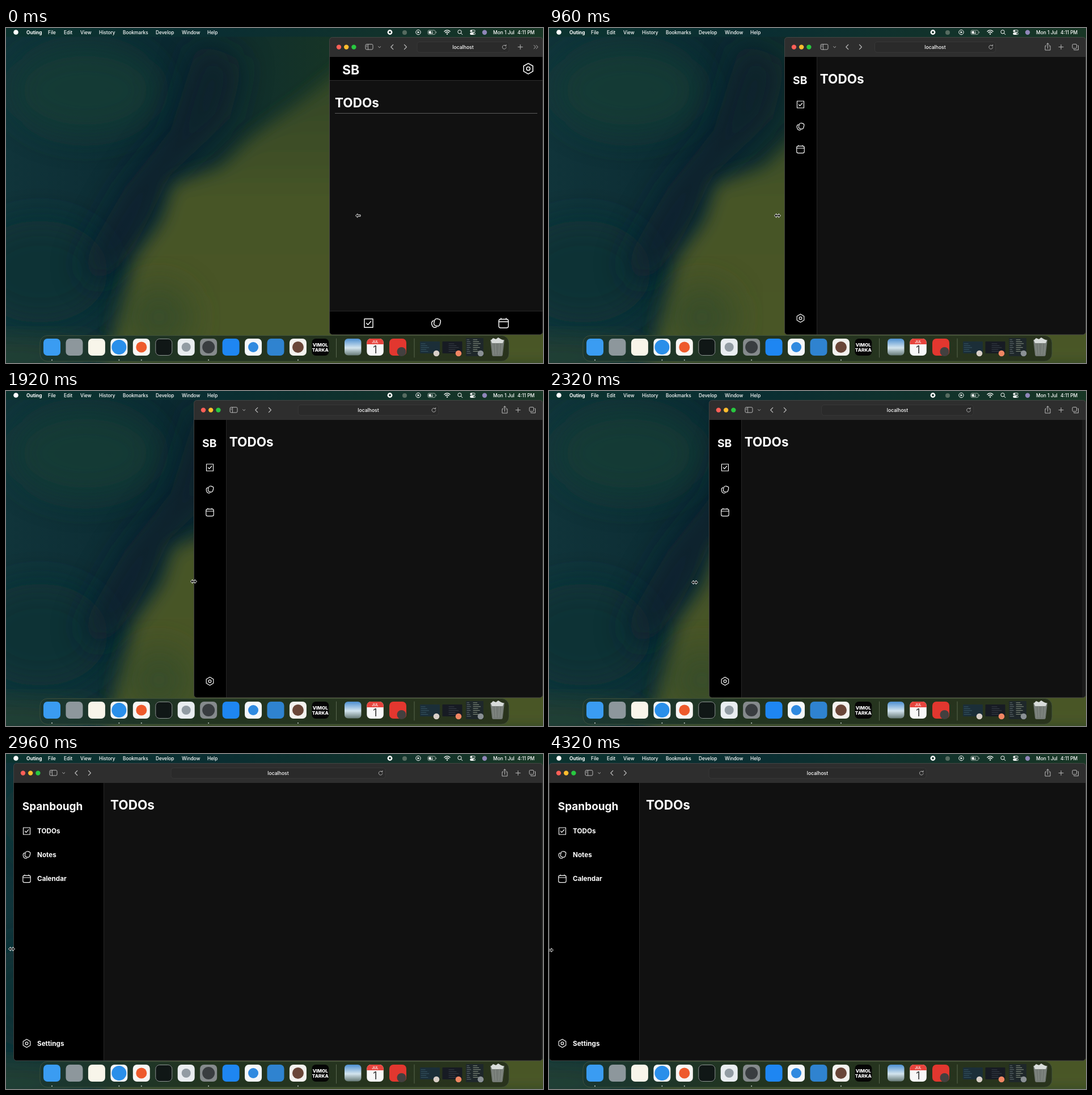
An HTML page for the animation above (4.4 s loop, 947 by 591 pixels).

```html
<!DOCTYPE html>
<html lang="en">
<head>
<meta charset="utf-8">
<title>Responsive sidebar</title>
<style>
  html, body { margin: 0; width: 100%; height: 100%; overflow: hidden; background: #0a2a31; }
  svg { position: absolute; left: 0; top: 0; width: 947px; height: 591px; }
  text { font-family: Inter, Roboto, sans-serif; fill: #fff; white-space: pre; }
</style>
</head>
<body>
<svg viewBox="0 0 947 591">
  <defs>
    <filter id="soft" x="-40%" y="-40%" width="180%" height="180%"><feGaussianBlur stdDeviation="28"/></filter>
    <filter id="edge" x="-30%" y="-30%" width="160%" height="160%"><feGaussianBlur stdDeviation="15"/></filter>
    <linearGradient id="night" x1="0" y1="0" x2="1" y2="0">
      <stop offset="0" stop-color="#10343a"/><stop offset=".3" stop-color="#0b2a32"/><stop offset=".6" stop-color="#163426"/><stop offset="1" stop-color="#1d3a26"/>
    </linearGradient>
    <linearGradient id="sunlit" x1="0" y1="0" x2="0" y2="1">
      <stop offset="0" stop-color="#2f4425"/><stop offset=".45" stop-color="#465427"/><stop offset="1" stop-color="#4b5728"/>
    </linearGradient>
    <linearGradient id="bar"><stop offset="0" stop-color="#0b332f"/><stop offset=".4" stop-color="#0a2e32"/><stop offset="1" stop-color="#183625"/></linearGradient>
    <linearGradient id="dockFill"><stop offset="0" stop-color="#1a3731"/><stop offset=".35" stop-color="#223420"/><stop offset="1" stop-color="#29331c"/></linearGradient>
    <linearGradient id="sky" x1="0" y1="0" x2="0" y2="1"><stop offset="0" stop-color="#4d8fd0"/><stop offset=".55" stop-color="#d3e4ee"/><stop offset="1" stop-color="#687b78"/></linearGradient>
  </defs>
  <g id="wallpaper"></g>
  <g id="window"></g>
  <g id="desktop"></g>
  <g id="pointer"></g>
</svg>
<script>
const LOOP = 4400, STEP = 80, STAGE_W = 947, TOP = 17, BOTTOM = 541;
const el = id => document.getElementById(id);

const rect = (x, y, w, h, fill, r = 0, more = '') =>
  `<rect x="${x}" y="${y}" width="${w}" height="${h}" rx="${r}" fill="${fill}" ${more}/>`;
const circle = (x, y, r, fill, more = '') => `<circle cx="${x}" cy="${y}" r="${r}" fill="${fill}" ${more}/>`;
const line = (d, color = '#fff', w = 1, more = '') =>
  `<path d="${d}" fill="none" stroke="${color}" stroke-width="${w}" stroke-linecap="round" stroke-linejoin="round" ${more}/>`;
const shape = (d, fill, more = '') => `<path d="${d}" fill="${fill}" ${more}/>`;
const text = (x, y, s, size, weight = 700, more = '') =>
  `<text x="${x}" y="${y}" font-size="${size}" font-weight="${weight}" ${more}>${s}</text>`;
const at = (x, y, body, scale = 1) => `<g transform="translate(${x} ${y}) scale(${scale})">${body}</g>`;

const outline = 'stroke="#fff" stroke-width="1.15"';
const icons = {
  todos: line('M-6-6h12v12h-12zM-3 0l2 2.3 4.2-4.8', '#fff', 1.15),
  notes: rect(-3, -6.4, 8.6, 10, 'none', 3.2, outline + ' transform="rotate(14)"') +
    line('M-3.6-3.6C-6.4-2.6-6.8-.8-6 2.2c.8 3.6 3.8 4.8 6.6 3.2', '#fff', 1.15),
  calendar: rect(-6.7, -5.6, 13.4, 12.2, 'none', 2.6, outline) +
    line('M-6.7-2h13.4M-3.6-7v1.4M3.6-7v1.4', '#fff', 1.15),
  settings: line('M0-7.2l6.3 3.6v7.2L0 7.2l-6.3-3.6v-7.2z', '#fff', 1.15) + circle(0, 0, 2.4, 'none', outline),
};
const icon = (name, x, y, scale = 1) => at(x, y, icons[name], scale);

function wallpaper() {
  const glow = (x, y, rx, ry, color, o = 1) =>
    `<ellipse cx="${x}" cy="${y}" rx="${rx}" ry="${ry}" fill="${color}" opacity="${o}" filter="url(#soft)"/>`;
  return rect(0, 0, STAGE_W, 591, 'url(#night)') +
    glow(140, 110, 130, 80, '#173c35', .8) +
    glow(60, 430, 120, 90, '#0d3036') +
    glow(20, 580, 150, 30, '#2b4430', .9) +
    shape('M340 20L420 60 395 160 290 260 225 390 165 460 130 420 210 280 290 180z', '#071f2a', 'filter="url(#soft)" opacity=".7"') +
    shape('M620 50L520 130 430 195 380 245 295 275 275 340 225 410 205 500 170 600H980V50z', 'url(#sunlit)', 'filter="url(#edge)"') +
    glow(270, 510, 60, 60, '#30482a', .7);
}

function menuBar() {
  const items = [['File', 74], ['Edit', 102], ['View', 131], ['History', 164], ['Bookmarks', 206],
    ['Develop', 264], ['Window', 310], ['Help', 355]];
  return rect(0, 0, STAGE_W, 15.5, 'url(#bar)') +
    circle(17.5, 7.5, 4.3, '#fff') +
    text(36, 10.5, 'Outing', 8.4) +
    items.map(([s, x]) => text(x, 10.5, s, 8.3, 500)).join('') +
    circle(677, 7.5, 4.4, '#fff') + rect(675.3, 5.8, 3.4, 3.4, '#143329', .6) +
    circle(703, 8, 4, '#566b60') +
    circle(727, 7.5, 4.2, 'none', 'stroke="#fff"') + shape('M725.7 5.3l3.6 2.2-3.6 2.2z', '#fff') +
    rect(744, 4, 13, 7.4, 'none', 2, 'stroke="#9aa8a0"') + rect(745.5, 5.5, 7.5, 4.4, '#fff', 1) +
    shape('M751.8 3.2l-3 4.8h2l-.8 3.6 3.2-5h-2z', '#143329') + line('M758.7 6.7v2', '#9aa8a0') +
    line('M773 6c3-2.7 7-2.7 10 0M775 8.2c2-1.6 4-1.6 6 0', '#fff', 1.4) + circle(778, 10.4, 1.2, '#fff') +
    circle(800, 6.8, 3.2, 'none', 'stroke="#fff"') + line('M802.5 9.2l2.4 2.5') +
    rect(818.7, 3.7, 8.5, 3.2, 'none', 1.6, 'stroke="#fff" stroke-width=".9"') + circle(820.5, 5.3, 1.5, '#fff') +
    rect(818.2, 8, 9.5, 4, '#fff', 2) + circle(825.6, 10, 1.3, '#143329') +
    circle(844, 7.7, 4.2, '#8f86b8') +
    text(859, 10.5, 'Mon 1 Jul', 8.4, 500) + text(902, 10.5, '4:11 PM', 8.4, 500);
}

function dock() {
  // tile colour, then the colour and radius of an inner disc
  const apps = [['#3a9cf2'], ['#8d979c'], ['#f8f5ea'], ['#f2f4f6', '#2a8fea', 13], ['#f7f5f3', '#ee5a2c', 9.5],
    ['#101716'], ['#e9edf0', '#929ca3', 8], ['#858a8c', '#393d40', 11], ['#1e86f2'], ['#f4f7fa', '#2f8ae0', 9],
    ['#2f83d0'], ['#f3f1ee', '#6a4638', 10], ['#050505']];
  const tile = (x, [color, disc, r]) => rect(x - 15, 548, 30, 30, color, 7) + (disc ? circle(x, 563, r, disc) : '');
  const name = (y, s) => text(554.3, y, s, 8.2, 800, 'text-anchor="middle"');
  const appX = i => 81 + i * 39.45;
  const scribbles = (x, y, w, rows, color) => {
    let d = '';
    for (let i = 0; i < rows; i++) d += `M${x} ${y + i * 3.4}h${w * (.45 + .5 * ((i * 7 % 5) / 5))}`;
    return line(d, color, .8);
  };
  return rect(60, 542.5, 827, 45.5, 'url(#dockFill)', 13, 'stroke="#46563f" stroke-width=".8"') +
    apps.map((app, i) => tile(appX(i), app)).join('') +
    rect(263.8, 548.5, 29, 29, 'none', 7, 'stroke="#8e9693"') +
    name(561.5, 'VIMOL') + name(570.5, 'TARKA') +
    [0, 3, 4, 7, 11].map(i => circle(appX(i), 585.8, 1, '#cbd3cc')).join('') +
    line('M582.5 548v33M720 548v33', '#5f6d54', .9) +
    rect(597, 548, 29.5, 29.5, 'url(#sky)', 6) +
    rect(636.3, 548, 29.5, 30, '#f8f8f8', 7) + shape('M636.3 558v-3a7 7 0 0 1 7-7h15.5a7 7 0 0 1 7 7v3z', '#e7443d') +
    text(651, 555.8, 'JUL', 6, 600, 'text-anchor="middle"') +
    text(651, 573.6, '1', 18, 400, 'text-anchor="middle" style="fill:#333"') +
    tile(691, ['#e2372f']) + circle(697.5, 571, 8, '#43403f') +
    rect(730, 553, 35, 21, '#1b2e38', 1) + scribbles(732, 557, 16, 5, '#3f6170') + circle(759, 574, 5.3, '#d8cfc8') +
    rect(769.5, 553, 35, 21, '#171b23', 1) + scribbles(781, 557, 20, 5, '#414852') + circle(798, 574, 5.3, '#f08663') +
    rect(811, 547, 31, 32, '#1e272a', 1) + scribbles(813, 550, 8, 8, '#77858a') + scribbles(824, 550, 15, 7, '#a9b49c') +
    circle(837, 574, 5.3, '#8a9094') +
    shape('M854 550h25l-3.2 27q-.3 2-2.3 2h-14q-2 0-2.3-2z', '#747a75') +
    shape('M855 551l4-4 5 2 4-3 5 3 5 2-2 5H857z', '#d8dcda') +
    line('M858 556l2 20M863 556l1 20M870 556l-1 20M875 556l-2 20', '#8f958f', .8);
}

function toolbar(left, narrow) {
  const width = STAGE_W - left, fieldW = 213 + .41 * (width - 532);
  const fieldX = narrow ? left + 155 : (left + STAGE_W - fieldW) / 2;
  const end = narrow ? 887 : fieldX + fieldW;
  const grey = '#b9b9b9';
  const plus = x => line(`M${x - 4} 33.5h8M${x} 29.5v8`, grey);
  const right = narrow
    ? plus(907) + line('M931 30.5l3 3-3 3M935 30.5l3 3-3 3', grey)
    : plus(903) + line('M877 31.5h-2v7.5h9v-7.5h-2M879.5 36v-9M877 29.3l2.5-2.5 2.5 2.5', grey) +
      rect(923, 28.5, 7.5, 7.5, 'none', 1.5, `stroke="${grey}"`) +
      line('M932.5 31h1v7.7h-7.8v-1', grey);
  return rect(left, TOP, width, 34, '#2e2e2e') +
    ['#ff5f57', '#febc2e', '#28c840'].map((c, i) => circle(left + 17 + i * 13.2, 33.6, 4.2, c)).join('') +
    at(left, 0, rect(64, 28.7, 13, 9.3, 'none', 2, `stroke="${grey}"`) +
      line('M68.5 29v9M65.8 31h1M65.8 33h1', grey, .9) +
      line('M86.7 32.7l2 2 2-2', grey) + line('M112.8 29.3l-4 4.2 4 4.2M132.4 29.3l4 4.2-4 4.2', '#c4c4c4', 1.1)) +
    rect(fieldX, 24.5, end - fieldX, 18.5, '#2a2a2a', 4.5, 'stroke="#3b3b3b" stroke-width=".8"') +
    text((fieldX + end) / 2, 36.8, 'localhost', 8.6, 500, 'text-anchor="middle"') +
    line(`M${end - 5.3} 32a3.4 3.4 0 1 0 .4 2.4M${end - 7.7} 30.6l2.4 1.4.3-2.6`, grey, .9) + right;
}

function phonePage(left) {
  const width = STAGE_W - left;
  const tab = i => left + 10 + (width - 20) * (i + .5) / 3;
  return rect(left, 51, width, 41.5, '#000') + rect(left, 92, width, 1, '#2f2f2f') +
    text(left + 23, 82.3, 'SB', 23) + icon('settings', 921, 71.7, 1.3) +
    text(left + 10, 140.3, 'TODOs', 22.5) + rect(left + 10, 150, width - 20, 1, '#5c5c5c') +
    rect(left, 499, width, 43, '#000') + rect(left, 499, width, 1, '#262626') +
    ['todos', 'notes', 'calendar'].map((n, i) => icon(n, tab(i), 520.7, 1.25)).join('');
}

const sidebar = (w, body) => rect(0, 51, w, 491, '#000') + rect(w, 51, 1, 491, '#262626') + body;

function compactPage(left) {
  return at(left, 0, sidebar(57, text(15, 98.5, 'SB', 19.3) +
    icon('todos', 28.5, 135) + icon('notes', 28.5, 174) + icon('calendar', 28.5, 214) + icon('settings', 28.5, 512)) +
    text(62.8, 98.4, 'TODOs', 22.5));
}

function fullPage(left) {
  const rows = [['todos', 'TODOs', 136], ['notes', 'Notes', 178], ['calendar', 'Calendar', 220], ['settings', 'Settings', 510.5]];
  return at(left, 0, sidebar(159, text(15.7, 98.5, 'Spanbough', 19) +
    rows.map(([n, label, y]) => icon(n, 23.5, y) + text(42, y + 4, label, 11.7)).join('')) +
    text(171, 98.4, 'TODOs', 22.5));
}

function browser(left, lag) {
  const width = STAGE_W - left;
  const page = left > 442 ? phonePage : left > 105 ? compactPage : fullPage;
  const frame = (fill, more) => rect(left + .5, TOP - .5, width - 1, BOTTOM - TOP + .5, fill, 5, more);
  return `<clipPath id="frame">${frame('#000')}</clipPath><g clip-path="url(#frame)">` +
    rect(left, TOP, width, 525, '#111') + page(left) +
    (lag > .5 ? rect(STAGE_W - lag, 51, lag, 491, '#1a1a1a') : '') +
    toolbar(left, left > 500) + '</g>' + frame('none', 'stroke="#484848" stroke-width=".9"');
}

function cursor(x, y, left) {
  const style = 'stroke="#fff" stroke-width=".9" stroke-linejoin="round"';
  const west = shape('M-4.5 0l3.4-3.4v2.1H4v2.6h-5.1v2.1z', '#111', style);
  const east = `<g transform="scale(-1 1)">${west}</g>`;
  const both = shape('M-5.5 0l3.4-3.5v2.2h4.2v-2.2L5.5 0 2.1 3.5V1.3h-4.2v2.2z', '#111', style);
  return at(x, y, left > 569 ? west : left < 1 ? east : both);
}

// time, pointer x, its speed, window edge, its speed, pointer y
const drag = [
  [0, 621, 0, 570, 0, 331],
  [640, 575, -.2, 570, 0, 331],
  [960, 403, -.2, 415, -.25, 331],
  [1920, 331, 0, 331, 0, 336],
  [2560, 172, -.37, 197.5, -.45, 338.5],
  [2960, 10, -.04, 13, -.1, 344],
  [3200, 4, 0, 0, 0, 345.5],
  [LOOP, 3, 0, 0, 0, 346],
];

function pose(t) {
  const i = drag.findIndex((k, n) => n && t <= k[0]);
  const a = drag[i - 1], b = drag[i], span = b[0] - a[0], u = (t - a[0]) / span;
  const hermite = n => {
    const s = u * u * (3 - 2 * u);
    return a[n] + (b[n] - a[n]) * s + span * (a[n + 1] * u * (1 - u) ** 2 - b[n + 1] * u * u * (1 - u));
  };
  return { x: hermite(1), left: Math.max(0, hermite(3)), y: a[5] + (b[5] - a[5]) * u };
}

function render(t) {
  const { x, y, left } = pose(t);
  const speed = pose(Math.max(0, t - 1)).left - left;
  // while dragging fast, the page repaints a little behind the frame
  el('window').innerHTML = browser(left, left < 330 ? speed * 27 : 0);
  el('pointer').innerHTML = cursor(x, y, left);
}

el('wallpaper').innerHTML = wallpaper();
el('desktop').innerHTML = menuBar() + dock();

let shown = -1;
const start = performance.now();
function tick() {
  const t = Math.floor((performance.now() - start) % LOOP / STEP) * STEP;
  if (t !== shown) render(shown = t);
  requestAnimationFrame(tick);
}
tick();
</script>
</body>
</html>
```
